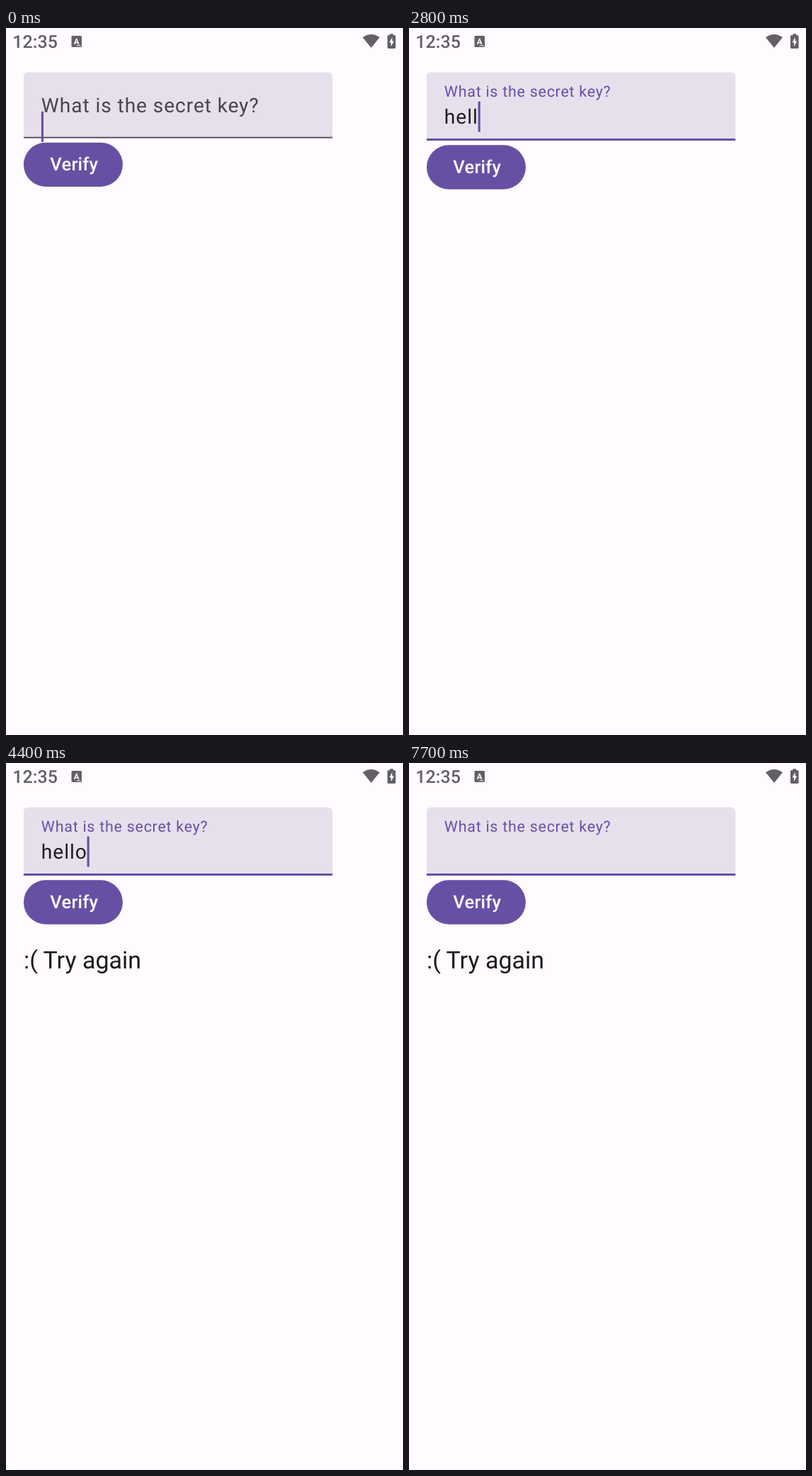
An HTML page with a canvas for the animation above (8 s loop, 561 px wide and 998 px high).

```html
<!DOCTYPE html>
<html lang="en">
<head>
<meta charset="utf-8">
<title>Secret key form</title>
<style>
  html, body { margin: 0; width: 100%; height: 100%; overflow: hidden; background: #fffbfe; }
  canvas { display: block; width: 561px; height: 998px; }
</style>
</head>
<body>
<canvas id="stage"></canvas>
<script>
const W = 561, H = 998, LOOP = 8000, BLINK = 500;
const DP = W / 360;
const BG = '#fffbfe', FIELD = '#e7e0ec', PRIMARY = '#6750a4', INK = '#1c1b1f', STATUS = '#626066';
const MUTED_RGB = [73, 69, 79], PRIMARY_RGB = [103, 80, 164];
const LEFT = 16 * DP, TEXT_X = 32 * DP, FIELD_TOP = 62.5, FIELD_W = 280 * DP;
const INPUT_SIZE = 28.2, INPUT_SPACING = 0.896, LINE_H = 43;

// Each edit also restarts the caret's blink cycle.
const edits = [
  [0, ''], [100, ''], [1800, 'h'], [2000, 'he'], [2700, 'hel'], [2800, 'hell'], [3000, 'hello'],
  [5700, 'helloa'], [5800, 'helloa'], [6600, 'hello'], [7200, '']
];
const RESULT_AT = 4200;
const focusSteps = [0, 0.4, 0.85, 1];

const canvas = document.getElementById('stage');
const ctx = canvas.getContext('2d');
const ratio = window.devicePixelRatio || 1;
canvas.width = W * ratio;
canvas.height = H * ratio;

const mix = (a, b, p) => a + (b - a) * p;

function setFont(size, spacing = 0, weight = 400) {
  ctx.font = `${weight} ${size}px Roboto, sans-serif`;
  ctx.letterSpacing = `${spacing}px`;
  ctx.textRendering = 'geometricPrecision';
}

function text(str, x, y, color, size, spacing, weight) {
  setFont(size, spacing, weight);
  ctx.fillStyle = color;
  ctx.fillText(str, x, y);
}

function box(x, y, w, h, color, radius = 0) {
  ctx.fillStyle = color;
  ctx.beginPath();
  ctx.roundRect(x, y, w, h, radius);
  ctx.fill();
}

function shape(path, color) {
  ctx.fillStyle = color;
  ctx.fill(new Path2D(path));
}

function drawStatusBar() {
  text('12:35', 9.2, 28.3, STATUS, 25, 0.1, 500);
  box(92.5, 11, 14.5, 16, STATUS, 1.5);
  text('A', 95.7, 22.6, BG, 11.5, 0, 700);
  box(99.5, 24.3, 6, 1, BG);
  shape('M504 13.3 Q516 4.8 528 13.3 L516 28 Z', STATUS);
  box(542.3, 8.3, 5, 4, STATUS, 0.8);
  box(539, 10.3, 11.6, 18.7, STATUS, 1.4);
  shape('M545.7 13 L541.5 20.6 H544.1 V26 L548.3 18.4 H545.7 Z', BG);
}

function drawField(t, focus) {
  const bottom = mix(155.4, 159.1, focus);
  const line = mix(1, 2, focus) * DP;
  const rgb = MUTED_RGB.map((c, i) => Math.round(mix(c, PRIMARY_RGB[i], focus)));
  const accent = `rgb(${rgb})`;

  box(LEFT, FIELD_TOP, FIELD_W, bottom - FIELD_TOP, FIELD, [6, 6, 0, 0]);
  box(LEFT, bottom - line, FIELD_W, line, accent);
  text('What is the secret key?', TEXT_X, mix(118.6, 96.7, focus), accent,
    mix(INPUT_SIZE, 21.5, focus), mix(INPUT_SPACING, 0.717, focus));

  const [since, value] = edits.filter(([at]) => at <= t).pop();
  const lineTop = mix(117.8, 103.6, focus);
  text(value, TEXT_X, lineTop + 31.1, INK, INPUT_SIZE, INPUT_SPACING);
  const caretX = TEXT_X + ctx.measureText(value).width;
  if (value.endsWith('a')) {
    const start = TEXT_X + ctx.measureText(value.slice(0, -1)).width;
    box(start, 136.9, caretX - start, 1.5, INK);
  }
  if (Math.floor((t - since) / BLINK) % 2 === 0) {
    box(caretX, lineTop, 2 * DP, LINE_H, PRIMARY);
  }
  return bottom;
}

function drawButton(top) {
  const h = 40 * DP;
  box(LEFT, top, 140, h, PRIMARY, h / 2);
  text('Verify', LEFT + 24 * DP, top + 39.8, '#fff', 25.55, 0.18, 500);
}

function draw(t) {
  ctx.setTransform(ratio, 0, 0, ratio, 0, 0);
  box(0, 0, W, H, BG);
  drawStatusBar();
  const focus = focusSteps[Math.min(3, Math.floor(t / 100))];
  const bottom = drawField(t, focus);
  drawButton(bottom + 4 * DP);
  if (t >= RESULT_AT) text(':( Try again', LEFT, 290.4, INK, 34);
}

const start = performance.now();
function tick() {
  draw((performance.now() - start) % LOOP);
  requestAnimationFrame(tick);
}
tick();
</script>
</body>
</html>
```
